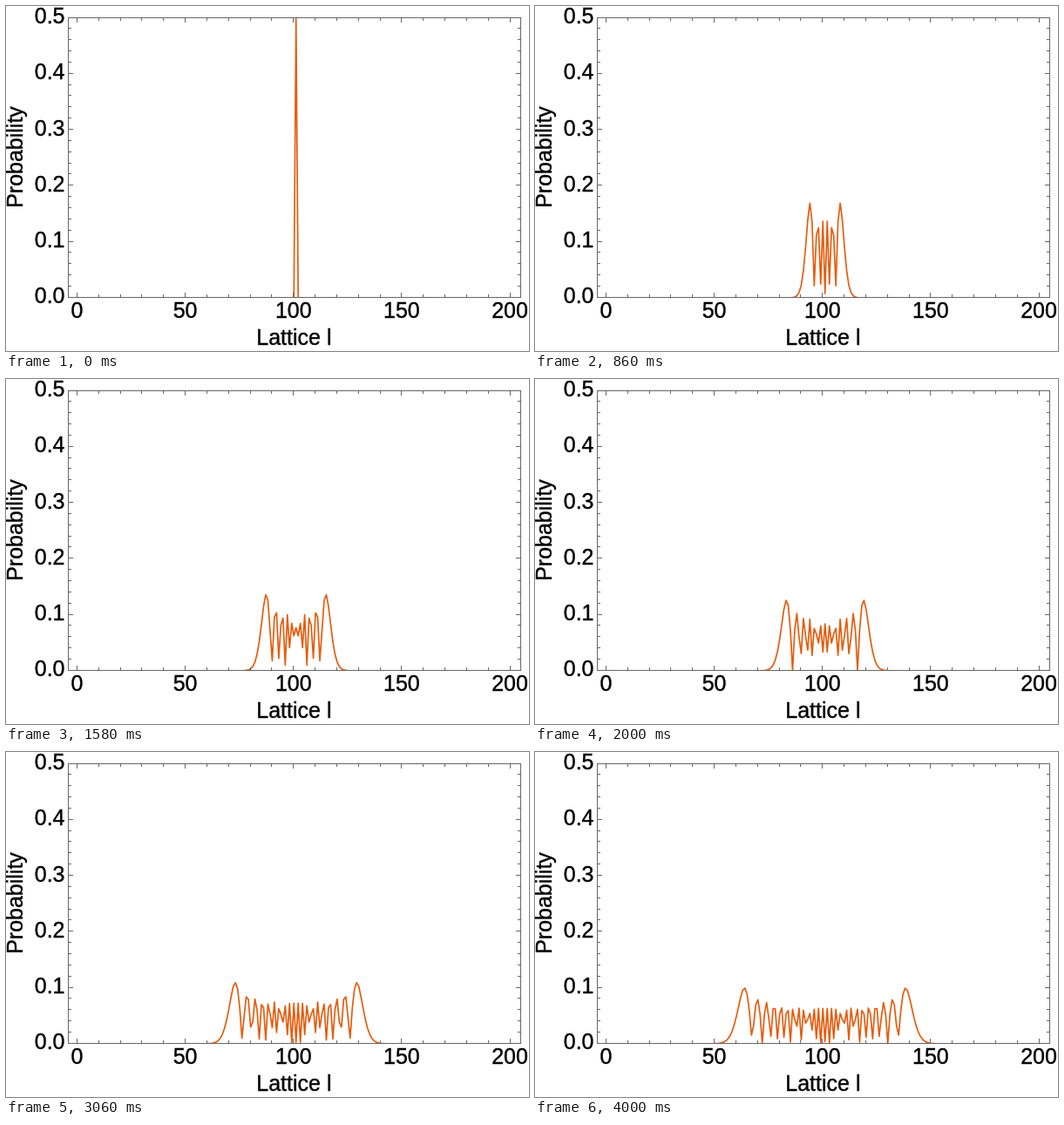
Recreate the animation shown at these times as an HTML page. Size 600 by 396 pixels, loop 4020 ms.

```html
<!DOCTYPE html>
<html lang="en">
<head>
<meta charset="utf-8">
<title>Probability on a lattice</title>
<style>
  html, body { margin: 0; width: 100%; height: 100%; overflow: hidden; background: #fff; }
  svg { display: block; }
  text {
    font: 25px Helvetica, "Liberation Sans", Arial, sans-serif;
    text-anchor: middle; stroke: #000; stroke-width: 0.4;
  }
  #yLabels text { text-anchor: end; }
  #curve { fill: none; stroke: #e65c0e; stroke-width: 1.7; stroke-linejoin: round; }
  #frame { fill: none; stroke: #666; shape-rendering: crispEdges; }
</style>
</head>
<body>
<svg width="600" height="396" viewBox="0 0 600 396">
  <clipPath id="area"><rect x="72" y="14" width="518" height="320.5"/></clipPath>
  <path id="curve" clip-path="url(#area)"/>
  <path id="frame"/>
  <g id="xLabels"></g>
  <g id="yLabels"></g>
  <text x="330.4" y="389">Lattice l</text>
  <text transform="translate(18.7 173.5) rotate(-90)">Probability</text>
</svg>
<script>
const LEFT = 72, RIGHT = 591, TOP = 13.52, BOTTOM = 334.8;
const CENTER = 101, STEP = 20, FRAMES = 201, SAMPLES = 128;
const byId = id => document.getElementById(id);
const toX = l => LEFT + (l + 4.02) / 209.04 * (RIGHT - LEFT);
const toY = p => BOTTOM - p / 0.5 * (BOTTOM - TOP);
const snap = v => Math.floor(v - 0.5) + 0.5; // centre of a pixel

function addLabel(group, x, y, label) {
  const text = document.createElementNS("http://www.w3.org/2000/svg", "text");
  text.setAttribute("x", x);
  text.setAttribute("y", y);
  text.textContent = label;
  byId(group).append(text);
}

function drawAxes() {
  const [left, right, top, bottom] = [LEFT, RIGHT, TOP, BOTTOM].map(snap);
  let d = `M${left} ${top}H${right}V${bottom}H${left}Z`;
  for (let l = 0; l <= 200; l += 10) {
    const major = l % 50 === 0, size = major ? 5.5 : 3.5;
    const x = snap(toX(l));
    d += `M${x} ${bottom}v${-size}M${x} ${top}v${size}`;
    if (major) addLabel("xLabels", toX(l) - 0.5, 357.5, l);
  }
  for (let i = 0; i <= 25; i++) {
    const major = i % 5 === 0, size = major ? 5.5 : 3.5;
    const y = snap(toY(i / 50));
    d += `M${left} ${y}h${size}M${right} ${y}h${-size}`;
    if (major) addLabel("yLabels", 67.5, toY(i / 50) + 6.5, (i / 50).toFixed(1));
  }
  byId("frame").setAttribute("d", d);
}

// Bessel function of the first kind, by its integral over a full period
function bessel(n, z) {
  let sum = 0;
  for (let k = 0; k < SAMPLES; k++) {
    const a = 2 * Math.PI * k / SAMPLES;
    sum += Math.cos(n * a - z * Math.sin(a));
  }
  return sum / SAMPLES;
}

function drawCurve(z) {
  const half = [];
  for (let n = 0; n <= z + 20; n++) {
    half.push(Math.abs(bessel(n, z)) / 2);
    if (n > z && half[n] < 3e-4) break;
  }
  const points = [];
  for (let n = 1 - half.length; n < half.length; n++) {
    points.push(`${toX(CENTER + n).toFixed(2)} ${toY(half[Math.abs(n)]).toFixed(2)}`);
  }
  byId("curve").setAttribute("d", "M" + points.join("L"));
}

let start, shown;
function tick(now) {
  start ??= now;
  const frame = Math.floor((now - start) / STEP) % FRAMES;
  if (frame !== shown) drawCurve(frame * 0.2);
  shown = frame;
  requestAnimationFrame(tick);
}

drawAxes();
drawCurve(0);
requestAnimationFrame(tick);
</script>
</body>
</html>
```
